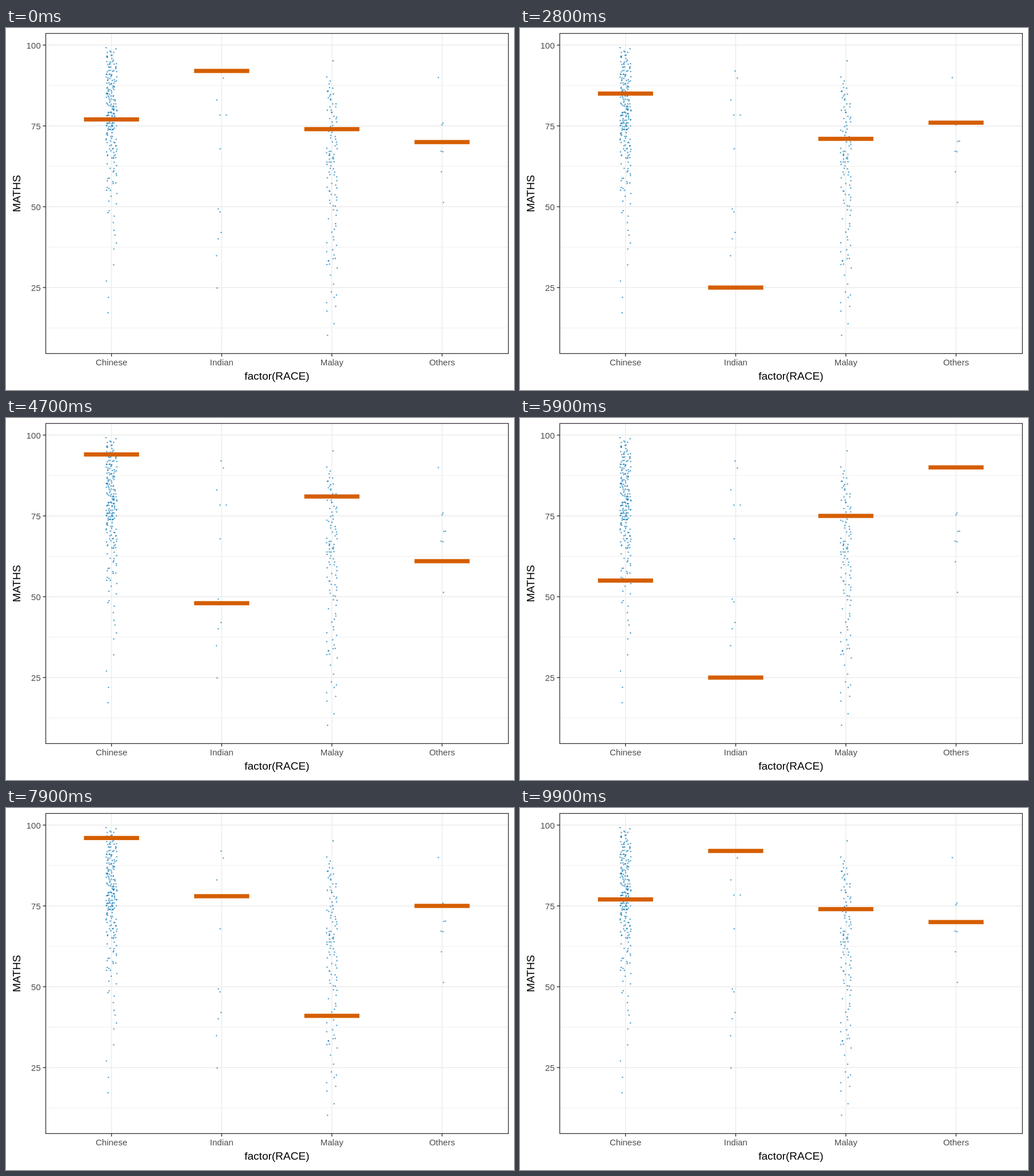
Write an HTML page that moves like this. It is 885 by 632 pixels and loops after 10000 ms.

```html
<!DOCTYPE html>
<html lang="en">
<head>
<meta charset="utf-8">
<title>Maths scores by group</title>
<style>
  html, body { margin: 0; width: 100%; height: 100%; overflow: hidden; background: #fff; }
  svg { display: block; width: 885px; height: 632px; }
  text { font-family: "Liberation Sans", Arial, sans-serif; font-size: 15px; fill: #4d4d4d; text-anchor: middle; }
  .title { font-size: 19px; fill: #000; }
  .end { text-anchor: end; }
</style>
</head>
<body>
<svg id="plot" viewBox="0 0 885 632"></svg>
<script>
const svg = document.getElementById('plot');
const groups = ['Chinese', 'Indian', 'Malay', 'Others'];
const left = 69.3, right = 875.3, ceiling = 9.5, floor = 568.4;
const xOf = i => 183.8 + 191.95 * i;
const yOf = v => 594.3 - 5.645 * v;

function add(tag, attrs, text) {
  const el = document.createElementNS('http://www.w3.org/2000/svg', tag);
  for (const k in attrs) el.setAttribute(k, attrs[k]);
  if (text) el.textContent = text;
  return svg.appendChild(el);
}
const line = (x1, y1, x2, y2, stroke, w) =>
  add('line', { x1, y1, x2, y2, stroke, 'stroke-width': w });

// Grid
const majors = [25, 50, 75, 100];
for (const v of majors) line(left, yOf(v - 12.5), right, yOf(v - 12.5), '#ebebeb', 0.75);
for (const v of majors) line(left, yOf(v), right, yOf(v), '#ebebeb', 1.4);
groups.forEach((g, i) => line(xOf(i), ceiling, xOf(i), floor, '#ebebeb', 1.4));

// Points
const dot = (x, y) => add('circle', { cx: x, cy: y, r: 1.3, fill: '#0072b2', 'fill-opacity': 0.62 });

let seed = 29;
function rand() {
  seed = (seed * 16807) % 2147483647;
  return seed / 2147483647;
}

// Jittered whole scores, ranked from the top; knots are [rank, score]
function cloud(group, knots) {
  for (let k = 1; k < knots.length; k++) {
    const [r0, v0] = knots[k - 1], [r1, v1] = knots[k];
    for (let r = r0; r < r1; r++) {
      const v = Math.round(v0 + (v1 - v0) * (r - r0) / (r1 - r0));
      dot(xOf(group) + (rand() - 0.5) * 19, yOf(v + (rand() - 0.5) * 0.7));
    }
  }
}
cloud(0, [[0, 99], [16, 94.5], [62, 86.5], [105, 79.5], [154, 73.5], [189, 64.5],
  [209, 54], [215, 47], [220, 37], [225, 12]]);
cloud(2, [[0, 95], [1, 90], [4, 87], [25, 77], [43, 67.5], [60, 63], [78, 53],
  [85, 48.5], [98, 35], [105, 31], [108, 24], [113, 18], [116, 6]]);

// Small groups: [offset from the group's centre, y]
const few = {
  1: [[-1, 75], [3, 87.5], [-8.5, 125.5], [-3, 152], [8, 152], [-2.5, 211], [-6, 316],
    [-3, 321], [-1, 357], [-6, 368], [-9, 397.5], [-8, 454]],
  3: [[-6.5, 86.5], [1.5, 166], [0, 169], [3, 198], [6, 197.5], [-1.5, 215],
    [1.5, 216], [-1, 251], [2.5, 304.5]]
};
for (const g in few) few[g].forEach(([dx, y]) => dot(xOf(g) + dx, y));

// Bars
const bars = groups.map((g, i) =>
  add('rect', { x: xOf(i) - 48, width: 96, height: 7.3, fill: '#d55e00' }));

// Frame, ticks and labels
add('rect', { x: left, y: ceiling, width: right - left, height: floor - ceiling,
  fill: 'none', stroke: '#333', 'stroke-width': 1.3 });
for (const v of majors) {
  line(left - 5, yOf(v), left, yOf(v), '#333', 1.4);
  add('text', { x: 60.5, y: yOf(v) + 5.7, class: 'end' }, String(v));
}
groups.forEach((g, i) => {
  line(xOf(i), floor, xOf(i), floor + 5, '#333', 1.4);
  add('text', { x: xOf(i), y: 589 }, g);
});
add('text', { x: 472, y: 614, class: 'title' }, 'factor(RACE)');
add('text', { transform: 'translate(24.5 289) rotate(-90)', class: 'title' }, 'MATHS');

// One sampled score per group in each draw
const draws = [
  [77, 92, 74, 70], [71, 49, 63, 67], [73, 40, 58, 70], [73, 83, 66, 67], [80, 68, 36, 67],
  [97, 78, 66, 76], [97, 78, 70, 61], [85, 25, 71, 76], [98, 68, 63, 67], [79, 83, 52, 70],
  [74, 49, 18, 90], [97, 48, 87, 61], [91, 48, 75, 61], [78, 68, 30, 70], [86, 92, 64, 67],
  [55, 25, 75, 90], [90, 49, 65, 70], [83, 25, 58, 67], [74, 48, 66, 67], [80, 92, 63, 70],
  [96, 78, 41, 75], [88, 68, 57, 67], [76, 40, 72, 70], [90, 78, 45, 61], [82, 48, 65, 67]
];
const tick = 100, ticks = 100;
// Tick at which draw i is halfway to the next one
const turn = i => 4 * i + (i < 12 ? 3 : 2);

function show(now) {
  const t = Math.floor(now / tick) % ticks;
  let i = 0;
  while (i < draws.length && turn(i) < t) i++;
  const from = draws[i % draws.length];
  const to = draws[(i + 1) % draws.length];
  const mix = i < draws.length && turn(i) === t ? 0.5 : 0;
  bars.forEach((bar, g) => {
    const v = from[g] + (to[g] - from[g]) * mix;
    bar.setAttribute('y', yOf(v) - 3.65);
  });
}

const start = performance.now();
function loop() {
  show(performance.now() - start);
  requestAnimationFrame(loop);
}
loop();
</script>
</body>
</html>
```
